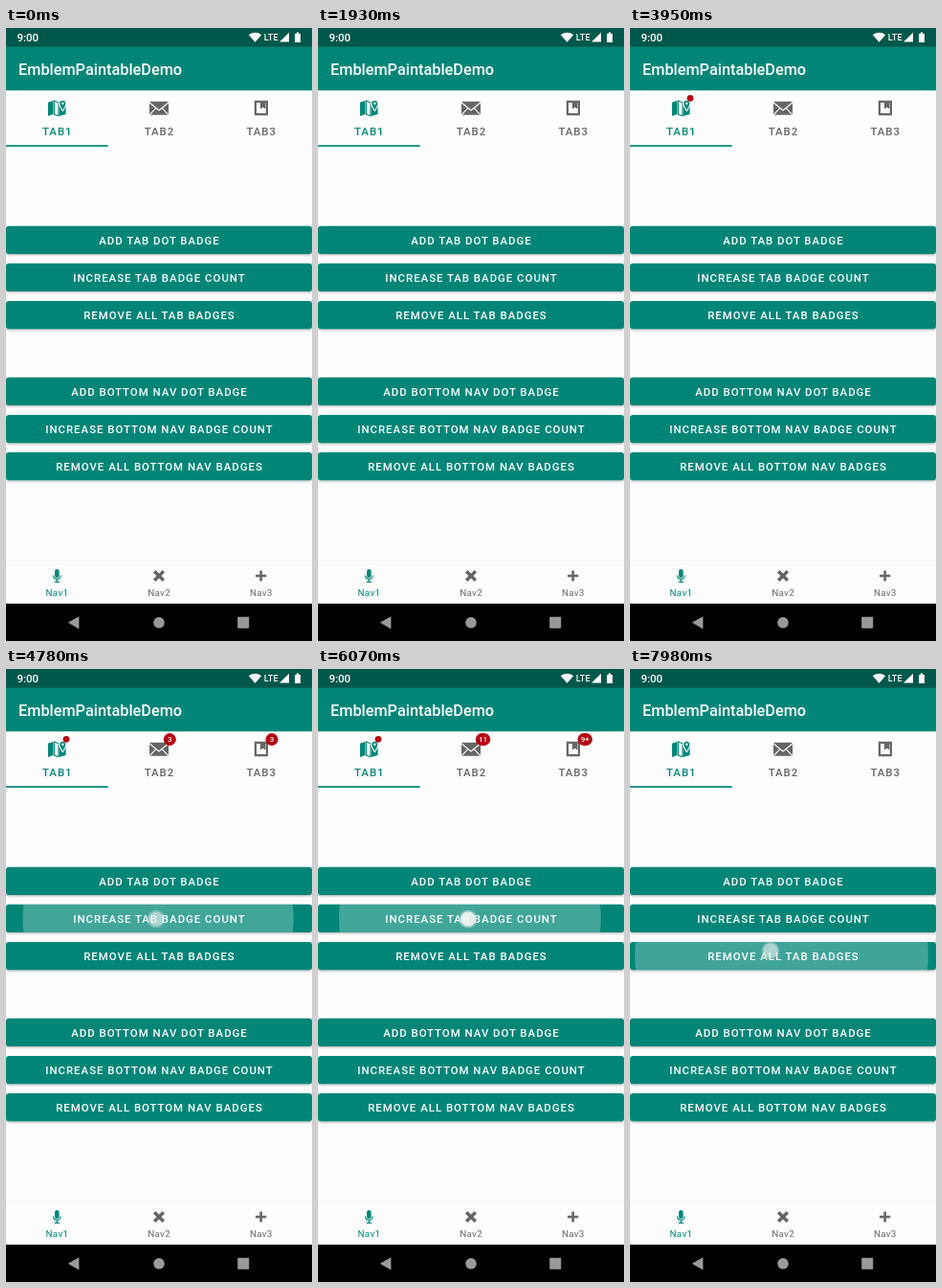
An HTML page that plays this animation: 320 by 640 pixels, repeating every 8 s.

```html
<!DOCTYPE html>
<html lang="en">
<head>
<meta charset="utf-8">
<title>Badges</title>
<style>
  html, body { margin: 0; width: 100%; height: 100%; overflow: hidden; background: #fdfdfd; }
  svg { display: block; width: 320px; height: 640px; }
  text { font-family: Roboto, "Noto Sans", sans-serif; font-weight: 500; }
  .mid { text-anchor: middle; }
  .caps { font-size: 11.4px; letter-spacing: 1px; }
  .nav { font-size: 9.8px; font-weight: 400; letter-spacing: .33px; }
  .num { font-size: 8.1px; }
  .on { fill: #008577; }
  .off { fill: #666; }
  .red { fill: #b4000f; }
  .white { fill: #fff; }
  .soft { fill: #999; }
</style>
</head>
<body>
<svg id="stage" viewBox="0 0 320 640">
  <defs>
    <filter id="shade" x="-5%" y="-20%" width="110%" height="150%">
      <feDropShadow dx="0" dy="1.2" stdDeviation=".9" flood-opacity=".28"/>
    </filter>
  </defs>
  <rect width="320" height="640" fill="#fdfdfd"/>

  <!-- Status and title bars -->
  <rect class="on" width="320" height="65.2"/>
  <rect width="320" height="19.6" fill="#00574b"/>
  <g class="white">
    <text x="11.5" y="14" font-size="11.5">9:00</text>
    <path d="M253.8 7.2Q260.5 2.4 267.2 7.2L260.5 14.8Z"/>
    <text x="269.8" y="13.2" font-size="9.2">LTE</text>
    <path d="M296 4.8V14.4H286Z"/>
    <path d="M302 6H303.7V4.6H306.3V6H308V15H302Z"/>
    <text x="13" y="48.8" font-size="16.3">EmblemPaintableDemo</text>
  </g>

  <!-- Tab icons -->
  <g class="on">
    <path d="M44 77.8L49.4 75.8V90L44 92Z"/>
    <path d="M50.4 76L55 77.8V91.8L50.4 90Z" fill="none" stroke="#008577" stroke-width="1.1"/>
    <path d="M55.6 77.8L62.6 75.6V90L55.6 92Z"/>
    <path d="M59.3 86.6C57 83.2 55.7 81.2 55.7 78.8A3.6 3.6 0 0 1 62.9 78.8C62.9 81.2 61.6 83.2 59.3 86.6Z"
      stroke="#fdfdfd" stroke-width="1.1"/>
    <circle cx="59.3" cy="78.7" r="1.2" fill="#fdfdfd"/>
    <rect y="122.2" width="106.7" height="1.7"/>
  </g>
  <rect class="off" x="150" y="76.8" width="20" height="14" rx="1.6"/>
  <path d="M150.2 78L160 86L169.8 78M150.4 90.4L156.8 83.6M169.6 90.4L163.2 83.6"
    fill="none" stroke="#fdfdfd" stroke-width="1.2"/>
  <path class="off" fill-rule="evenodd" d="M259.8 75.8H274V91.2H259.8ZM262 78V89H271.8V78Z"/>
  <path class="off" d="M265.8 77H271.4V84.6L268.6 82.7L265.8 84.6Z"/>

  <g id="tabs"></g>
  <g id="badges"></g>
  <g id="buttons"></g>

  <!-- Bottom navigation -->
  <rect y="555.4" width="320" height="1" fill="#000" opacity=".045"/>
  <g class="on">
    <rect x="51" y="565" width="4.6" height="9" rx="2.3"/>
    <path d="M49.4 571.5A3.9 3.9 0 0 0 57.2 571.5M53.3 575.4V578.4M50.8 578.4H55.8"
      fill="none" stroke="#008577" stroke-width="1.2"/>
  </g>
  <path d="M155.2 567.2L164.8 576.8M164.8 567.2L155.2 576.8" stroke="#666" stroke-width="3.5"/>
  <path d="M261 572H272.2M266.6 566.4V577.6" stroke="#666" stroke-width="2.6"/>
  <g id="navs"></g>

  <!-- System bar -->
  <rect y="601" width="320" height="39"/>
  <path class="soft" d="M64.8 620.8L76.4 614.2V627.4Z"/>
  <circle class="soft" cx="160" cy="620.8" r="5.8"/>
  <rect class="soft" x="242.2" y="614.8" width="12" height="12" rx=".8"/>

  <g id="ripples"></g>
  <g id="touch">
    <circle r="9.6" fill="#b0d4d0" opacity=".6"/>
    <circle r="7.8" fill="#f6f8f4" opacity=".85"/>
  </g>
</svg>
<script>
const LOOP = 8000, HOLD = 102, GROW = 245, FADE_AT = 160, FADE = 75;
const SVG = 'http://www.w3.org/2000/svg';
const $ = id => document.getElementById(id);
const clamp = v => Math.max(0, Math.min(1, v));
const set = (el, attrs) => {
  for (const k in attrs) el.setAttribute(k, attrs[k]);
  return el;
};
const add = (parent, tag, attrs, text = '') => {
  const el = set(document.createElementNS(SVG, tag), attrs);
  el.textContent = text;
  parent.appendChild(el);
  return el;
};

const columns = [53.3, 160, 266.7];
columns.forEach((x, i) => {
  const tone = i ? 'off' : 'on';
  add($('tabs'), 'text', { x: x + .5, y: 112, class: `mid caps ${tone}` }, `TAB${i + 1}`);
  add($('navs'), 'text', { x: x + .1, y: 592.8, class: `mid nav ${tone}` }, `Nav${i + 1}`);
});

const labels = [
  [206.7, 'ADD TAB DOT BADGE'],
  [245.8, 'INCREASE TAB BADGE COUNT'],
  [284.9, 'REMOVE ALL TAB BADGES'],
  [364.8, 'ADD BOTTOM NAV DOT BADGE'],
  [403.9, 'INCREASE BOTTOM NAV BADGE COUNT'],
  [443, 'REMOVE ALL BOTTOM NAV BADGES']
];
const defs = document.querySelector('defs');
labels.forEach(([y, label], i) => {
  const box = { x: 0, y, width: 320, height: 29.3, rx: 3.2 };
  add($('buttons'), 'rect', { ...box, class: 'on', filter: 'url(#shade)' });
  add($('buttons'), 'text', { x: 160.5, y: y + 19.2, class: 'mid caps white' }, label);
  add(add(defs, 'clipPath', { id: `clip${i}` }), 'rect', box);
});

const dot = add($('badges'), 'circle', { cx: 63, cy: 73.3, r: 3.4, class: 'red' });
const pills = [164.8, 271.5].map(x => {
  const g = add($('badges'), 'g', {});
  return {
    x, g,
    box: add(g, 'rect', { x, y: 67, height: 13, rx: 6.5, class: 'red' }),
    text: add(g, 'text', { y: 76.4, class: 'mid num white' })
  };
});

// Each tap: press time, button row, finger position
const taps = [{ at: 3600, row: 0, x: 157, y: 222 }];
for (let k = 1; k <= 21; k++) {
  const at = k < 12 ? 4670 + 145 * (k - 3) : 5975 + 153 * (k - 12);
  taps.push({ at, row: 1, x: 157, y: 261 });
}
taps.push({ at: 7820, row: 2, x: 147, y: 294 });

const ripples = [0, 1, 2].map(() => {
  const g = add($('ripples'), 'g', {});
  return { g, circle: add(g, 'circle', { fill: '#fff' }) };
});

function drawBadges(t) {
  const done = taps.filter(p => t >= p.at + HOLD);
  const cleared = done.some(p => p.row === 2);
  const count = cleared ? 0 : done.filter(p => p.row === 1).length;
  set(dot, { visibility: done.length && !cleared ? 'visible' : 'hidden' });
  pills.forEach((p, i) => {
    const text = i && count > 9 ? '9+' : String(count);
    const width = text.length > 1 ? 15.4 : 13;
    set(p.g, { visibility: count ? 'visible' : 'hidden' });
    set(p.box, { width });
    set(p.text, { x: p.x + width / 2 });
    p.text.textContent = text;
  });
}

function drawRipples(t) {
  const live = taps.filter(p => t >= p.at && t < p.at + FADE_AT + FADE);
  ripples.forEach(({ g, circle }, i) => {
    const p = live[i];
    set(g, { visibility: p ? 'visible' : 'hidden' });
    if (!p) return;
    const age = t - p.at;
    const ease = 1 - (1 - clamp(age / GROW)) ** 2;
    const mid = labels[p.row][0] + 14.65;
    set(g, { 'clip-path': `url(#clip${p.row})` });
    set(circle, {
      cx: p.x + (160 - p.x) * ease,
      cy: p.y + (mid - p.y) * ease,
      r: 96 + 65 * ease,
      opacity: .26 * clamp(.4 + age / 50) * (1 - clamp((age - FADE_AT) / FADE))
    });
  });
}

function drawTouch(t) {
  const p = taps.filter(q => t >= q.at).pop();
  const age = p ? t - p.at : Infinity;
  const alpha = age < HOLD ? 1 : .65 * (1 - clamp((age - HOLD - 60) / 70));
  set($('touch'), { opacity: alpha });
  if (p) set($('touch'), { transform: `translate(${p.x} ${p.y})` });
}

function frame() {
  const t = performance.now() % LOOP;
  drawBadges(t);
  drawRipples(t);
  drawTouch(t);
  requestAnimationFrame(frame);
}
frame();
</script>
</body>
</html>
```
